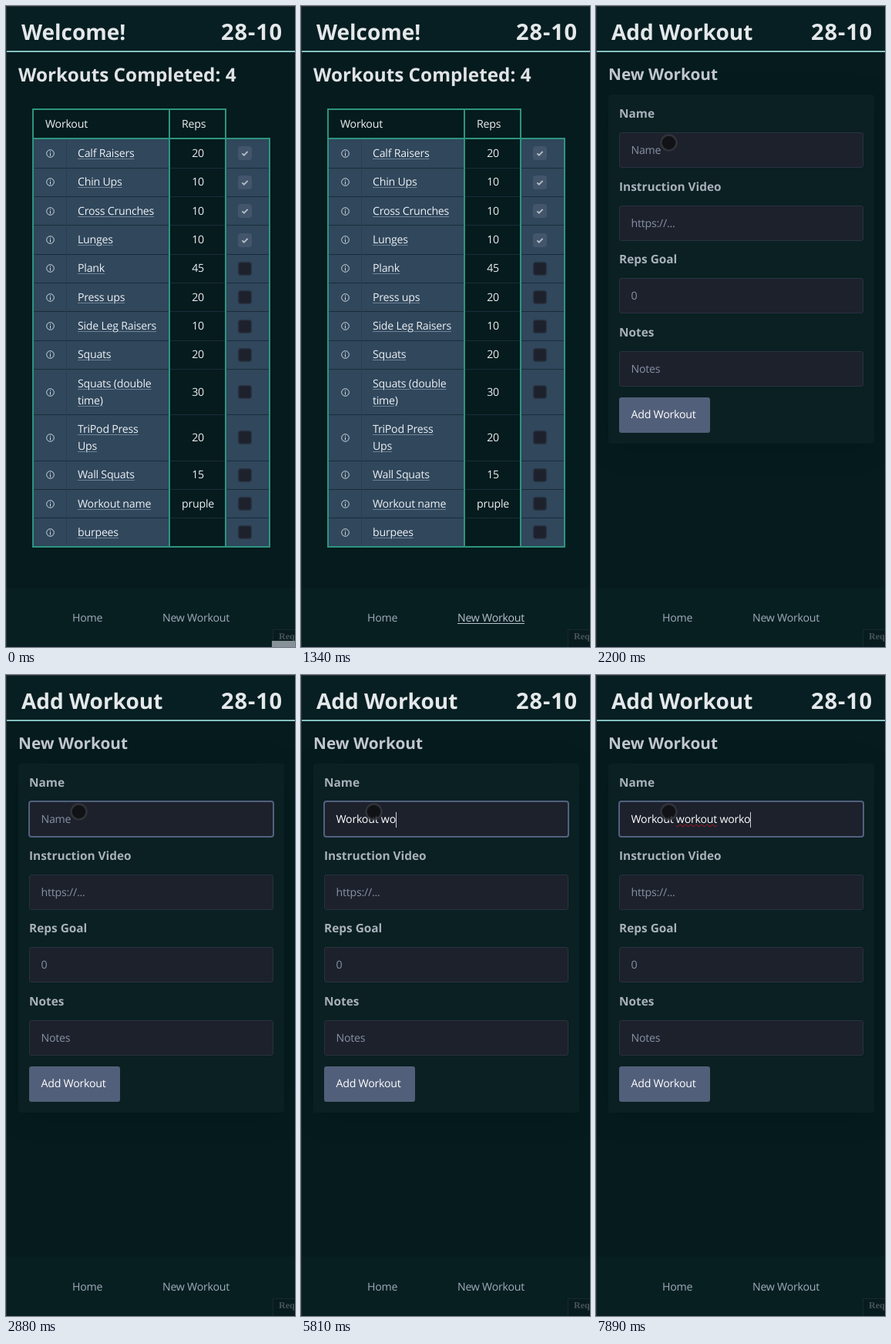
An HTML page for the animation above (8000 ms loop, 375 by 832 pixels).

```html
<!DOCTYPE html>
<html lang="en">
<head>
<meta charset="utf-8">
<title>Workout tracker</title>
<style>
  html, body { margin: 0; width: 100%; height: 100%; overflow: hidden; background: #051b1d; }
  #stage {
    position: absolute; left: 0; top: 0; width: 375px; height: 832px; overflow: hidden;
    background: #051b1d;
    font: 14.2px "Open Sans", "Noto Sans", sans-serif; letter-spacing: -.25px;
    text-rendering: geometricPrecision; color: #edf0f4;
  }
  #stage * { box-sizing: border-box; }
  .box, .text, .page, svg { position: absolute; }
  .page { inset: 0; }

  /* zero-height line: "top" is the baseline */
  .text { line-height: 0; margin-top: -.388em; white-space: pre; }
  .mid { transform: translateX(-50%); }
  .title { font-size: 28px; font-weight: 700; letter-spacing: 0; color: #e4e8eb; }
  .date { font-size: 29px; letter-spacing: .03em; }
  .count { font-size: 24.3px; font-weight: 700; letter-spacing: 0; color: #e0e3e7; }
  .sub { font-size: 20.8px; font-weight: 700; letter-spacing: 0; color: #c2c7d0; }
  .label { font-size: 15.4px; font-weight: 700; letter-spacing: 0; color: #a9b0bb; }
  .link { text-decoration: underline #6f8294 1px; text-underline-offset: 2px; }
  .nav { color: #a0abbb; }
  .hint { color: #8891a4; }
  .light { color: #fff; }
  .tip { font: 700 12px "Liberation Serif", serif; line-height: 0; letter-spacing: 0; color: #48545a; }

  .field { background: #1c212c; border: 1px solid #2a3140; border-radius: 3px; }
  .ring { border: 2px solid #52607e; border-radius: 4px; animation: focus 8s linear infinite; }
  .card { background: #0a2022; border-radius: 4px; box-shadow: 0 6px 40px rgba(0, 0, 0, .1); }
  .button { background: #525f7a; border-radius: 3px; }

  #list { animation: list 8s step-end infinite; }
  #form { animation: form 8s step-end infinite; }
  .hover { color: #b9c1cd; text-decoration: underline 1px; text-underline-offset: 2px; animation: hover 8s step-end infinite; }
  .cool { animation: cool 8s step-end infinite; }
  .flash { animation: flash 8s step-end infinite; }
  .wrong { text-decoration: underline wavy #b3141c 1px; text-underline-offset: 1px; text-decoration-skip-ink: none; }
  #caret { position: absolute; top: -10px; width: 1px; height: 20px; background: #c9ced6; }
  #touch {
    left: -11px; top: -11px; width: 22px; height: 22px; border-radius: 50%;
    background: rgba(14, 15, 18, .8); border: 2px solid rgba(62, 64, 70, .85);
    animation: move 8s linear infinite, show 8s step-end infinite;
  }

  @keyframes list { 0% { visibility: visible } 20%, 100% { visibility: hidden } }
  @keyframes form { 0% { visibility: hidden } 20%, 100% { visibility: visible } }
  @keyframes hover { 0% { opacity: 0 } 16.75% { opacity: 1 } 20%, 100% { opacity: 0 } }
  @keyframes cool { 0% { opacity: 1 } 16.75% { opacity: 0 } 20%, 100% { opacity: 1 } }
  @keyframes flash { 0% { opacity: 1 } .875%, 100% { opacity: 0 } }
  @keyframes focus { 0%, 29.3% { opacity: 0 } 31.75%, 100% { opacity: 1 } }
  @keyframes show {
    0% { opacity: 0 } 2.625% { opacity: 1 } 16.75% { opacity: 0 } 20.8%, 100% { opacity: 1 }
  }
  @keyframes move {
    0%, 2.625% { transform: translate(245px, 784px) }
    3.375%, 5.5% { transform: translate(218px, 796px) }
    6.5% { transform: translate(217px, 806px) }
    7.5%, 9% { transform: translate(236px, 781px) }
    12.5% { transform: translate(135px, 613px) }
    16%, 20% { transform: translate(225px, 804px) }
    22% { transform: translate(60px, 400px) }
    25%, 100% { transform: translate(94.5px, 177.5px) }
  }
</style>
</head>
<body>
<div id="stage">
  <div id="chrome" class="page"></div>
  <div id="list" class="page"></div>
  <div id="form" class="page"></div>
  <div id="over" class="page"><div id="touch" class="box"></div></div>
</div>
<script>
const $ = id => document.getElementById(id);

function add(parent, cls, x, y, css = {}) {
  const el = document.createElement('div');
  el.className = cls;
  Object.assign(el.style, { left: x + 'px', top: y + 'px' }, css);
  parent.append(el);
  return el;
}
function box(parent, x, y, w, h, background = '', cls = '') {
  return add(parent, 'box ' + cls, x, y, { width: w + 'px', height: h + 'px', background });
}
function text(parent, x, base, str, cls = '') {
  const el = add(parent, 'text ' + cls, x, base);
  el.textContent = str;
  return el;
}

// header and footer
const shell = $('chrome');
box(shell, 0, 0, 375, 58, '#071f22');
box(shell, 0, 58, 375, 2, '#84c0c0');
box(shell, 0, 755, 375, 77, '#071f21');
box(shell, 0, 0, 375, 1, '#2d3335');
box(shell, 0, 0, 1, 832, '#2d3335');
Object.assign(text(shell, 0, 45, '28-10', 'title date').style, { left: 'auto', right: '16px' });
text(shell, 86, 800, 'Home', 'nav');
text(shell, 203, 800, 'New Workout', 'nav cool');
text(shell, 203, 800, 'New Workout', 'nav hover');
box(shell, 346, 809, 30, 24, '#081c1f').style.border = '1px solid #17292c';
text(shell, 354, 823, 'Req', 'tip');
box(shell, 345, 824, 30, 8, '#869297', 'flash');

// workout table
const list = $('list');
const TEAL = '#2d9480', SLATE = '#30475c', RULE = '#1b2c3a';
const TOP = 172.3, ROW = 37.35, TALL = 59.2, END = 702;
const rows = [
  ['Calf Raisers', 20, 1], ['Chin Ups', 10, 1], ['Cross Crunches', 10, 1], ['Lunges', 10, 1],
  ['Plank', 45], ['Press ups', 20], ['Side Leg Raisers', 10], ['Squats', 20],
  ['Squats (double\ntime)', 30], ['TriPod Press\nUps', 20], ['Wall Squats', 15],
  ['Workout name', 'pruple'], ['burpees', '']
];
text(list, 20, 45, 'Welcome!', 'title');
text(list, 16, 99, 'Workouts Completed: 4', 'count');
box(list, 35, 172, 177, 530, SLATE);
box(list, 285, 172, 57, 530, SLATE);
text(list, 51, 159, 'Workout');
text(list, 228, 159, 'Reps');

const svg = (x, y, size, body) => {
  const el = add(list, 'box', x, y, { width: size + 'px', height: size + 'px' });
  el.innerHTML = `<svg width="${size}" height="${size}" fill="none">${body}</svg>`;
};
const info = '<g stroke="#d3dae1"><circle cx="6.5" cy="6.5" r="4.8"/><path d="M6.5 3.6v1.2M6.5 5.8v3.8"/></g>';
const checked = '<rect x="1" y="1" width="18" height="18" rx="3.5" fill="#43556b"/>' +
  '<path d="M6.4 10.3l2.5 2.4 4.7-4.8" stroke="#b4bec9" stroke-width="1.8"/>';
const empty = '<rect x="1.7" y="1.7" width="16.6" height="16.6" rx="3" fill="#1c212c" stroke="#293241" stroke-width="1.5"/>';

let y = TOP;
for (const [name, reps, done] of rows) {
  const lines = name.split('\n');
  const h = lines.length > 1 ? TALL : ROW;
  const mid = y + h / 2 + .5;
  if (y > TOP) box(list, 35, Math.round(y), 307, 1, RULE);
  svg(51, Math.round(mid - 6.5), 13, info);
  lines.forEach((line, i) =>
    text(list, 93, Math.round(mid + 5.5 + (i - (lines.length - 1) / 2) * 22), line, 'link'));
  text(list, 249, Math.round(mid + 5.5), reps, 'mid');
  svg(300, Math.round(mid - 10), 20, done ? checked : empty);
  y += h;
}
box(list, 78, 173, 1, 529, '#293e51');
for (const [x, top] of [[34, 133], [211, 133], [284, 133], [341, 171]])
  box(list, x, top, 2, END - top, TEAL);
box(list, 34, 133, 252, 2, TEAL);
box(list, 34, 171, 309, 2, TEAL);
box(list, 34, END - 1, 309, 2, TEAL);

// add-workout form
const form = $('form');
text(form, 20, 45, 'Add Workout', 'title');
text(form, 16, 97, 'New Workout', 'sub');
box(form, 16, 115, 345, 453, '', 'card');
let hint;
[['Name', 'Name'], ['Instruction Video', 'https://...'], ['Reps Goal', '0'], ['Notes', 'Notes']]
  .forEach(([label, sample], i) => {
    const dy = Math.round(i * 94.7);
    text(form, 30, 146 + dy, label, 'label');
    box(form, 30, 164 + dy, 317, 46, '', 'field');
    const el = text(form, 45.5, 193 + dy, sample, 'hint');
    hint ||= el;
  });
box(form, 29, 163, 319, 48, '', 'ring');
box(form, 30, 508, 117.5, 45.5, '', 'button');
text(form, 45.5, 536, 'Add Workout', 'light');

const entry = text(form, 45.5, 193, '', 'light');
entry.innerHTML = '<span></span><span></span><span></span><i id="caret"></i>';
const parts = entry.querySelectorAll('span');
const caret = $('caret');

// typing, on the same clock as the keyframes
const PHRASE = 'Workout workout worko';
const KEYS = [3810, 4140, 4940, 5000, 5140, 5200, 5330, 5540, 5670, 5810, 5870,
  5940, 6080, 6220, 6280, 6490, 6620, 7500, 7690, 7760, 7890];
const FOCUS = 2350, BLINK = 530, LOOP = 8000;
const LEAD = 25; // scripted changes reach the screen a frame late
const clock = form.getAnimations()[0];

function frame() {
  const t = ((clock.currentTime || 0) + LEAD) % LOOP;
  const n = KEYS.filter(k => k <= t).length;
  const typed = PHRASE.slice(0, n);
  const last = n ? KEYS[n - 1] : FOCUS;
  parts[0].textContent = typed.slice(0, 8);
  parts[1].textContent = typed.slice(8, 15);
  parts[1].className = n > 15 ? 'wrong' : '';
  parts[2].textContent = typed.slice(15);
  hint.style.opacity = n ? 0 : 1;
  caret.style.opacity = t >= FOCUS && Math.floor((t - last) / BLINK) % 2 === 0 ? 1 : 0;
  requestAnimationFrame(frame);
}
frame();
</script>
</body>
</html>
```
